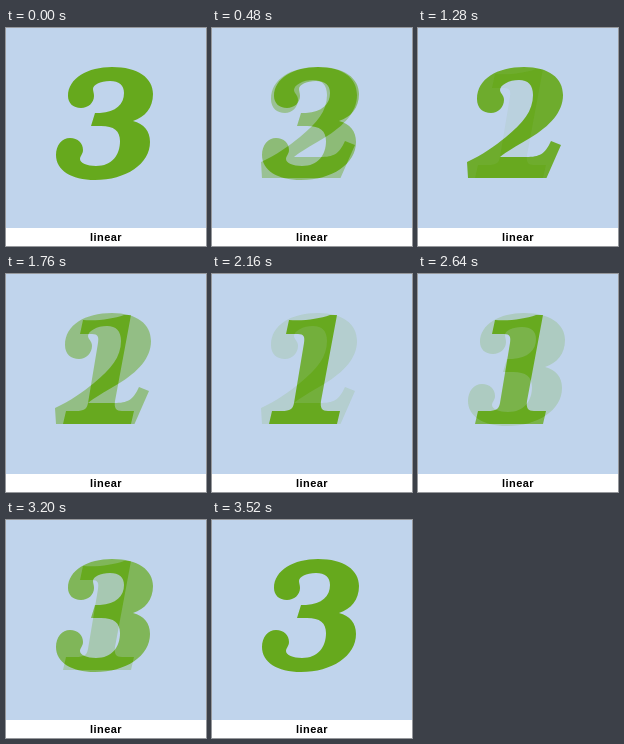
Recreate the animation shown at these times as an HTML page. Size 200x218 px, loop 3.6 s.

```html
<!DOCTYPE html>
<html lang="en">
<head>
<meta charset="utf-8">
<title>Digit crossfade</title>
<style>
  html, body { margin: 0; width: 100%; height: 100%; overflow: hidden; background: #fff; }
  svg { display: block; }
  .digits { isolation: isolate; fill: #66a91d; }
  .digits path { mix-blend-mode: plus-lighter; opacity: 0; }
  text { font: bold 11px "Liberation Sans", Arial, sans-serif; letter-spacing: .45px; text-anchor: middle; }
</style>
</head>
<body>
<svg width="200" height="218" viewBox="0 0 200 218">
  <rect width="200" height="200" fill="#c0d4ec"/>
  <g class="digits">
    <path id="three" d="M62 68C62 50 82 39 106 39C132 39 147 50 147 66C147 80 139 89 127 93C138 96 144 103 144 114C144 136 120 152 89 152C65 152 50 142 50 127C50 117 56 110 64 110C72 110 77 115 77 122C77 126 74 128 74 131C74 135 81 138 90 138C106 138 114 127 114 113C114 103 108 98 95 98L85 98L89 85L94 85C110 84 118 76 118 65C118 57 113 53 104 53C94 53 87 57 87 61C87 63 88 65 88 68C88 75 82 80 75 80C67 80 62 75 62 68Z"/>
    <path id="two" d="M59 71C59 51 79 39 106 39C131 39 145 50 145 67C145 84 132 98 112 110C98 118 88 124 82 129L108 129C122 129 127 126 133 113L143 117L128.5 150L50 150L49 134C64 127 77 118 88 109C105 95 115 83 115 67C115 57 110 52 101 52C91 52 82 57 82 62C82 65 86 67 86 72C86 79 80 85 73 85C65 85 59 80 59 71Z"/>
    <path id="one" d="M77 46C92 47 107 45 118 41L125 41L109 127C108 134 110 137 116 137L128 137L125 150L57 150L60 137L70 137C78 137 81 135 82 129L92 69C93 63 92 60 86 60L74 60Z"/>
  </g>
  <text x="100" y="213">linear</text>
</svg>
<script>
  const LOOP = 3600, PHASE = 1200, FADE = 1120;

  // Opacity at the start of each phase, and again at the end of the loop.
  const levels = {
    three: [1, 0, 0, 1],
    two:   [0, 1, 0, 0],
    one:   [0, 0, 1, 0]
  };

  // Each phase fades in 14 even steps, then holds until the next one.
  function frames(list) {
    const keys = [];
    for (let i = 0; i < 3; i++) {
      const start = i * PHASE;
      keys.push({ offset: start / LOOP, opacity: list[i], easing: "steps(14, end)" });
      keys.push({ offset: (start + FADE) / LOOP, opacity: list[i + 1], easing: "linear" });
    }
    keys.push({ offset: 1, opacity: list[3] });
    return keys;
  }

  for (const [id, list] of Object.entries(levels)) {
    const fade = document.getElementById(id).animate(frames(list), { duration: LOOP, iterations: Infinity });
    fade.startTime = 0;
  }
</script>
</body>
</html>
```
